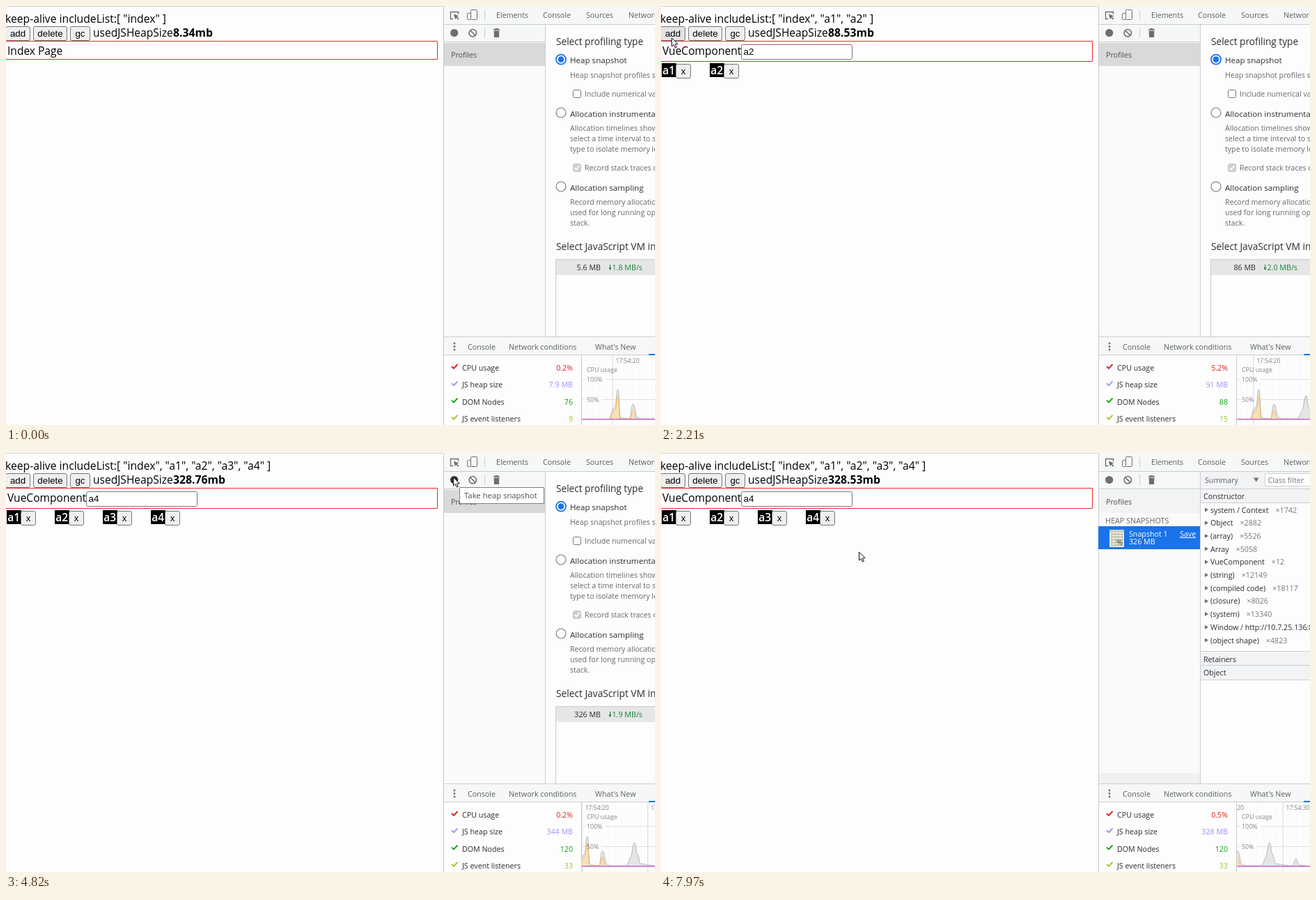
Recreate the animation shown at these times as an HTML page with a canvas. Size 932 by 601 pixels, loop 8 s.

```html
<!DOCTYPE html>
<html lang="en">
<head>
<meta charset="utf-8">
<title>Heap profiling of keep-alive</title>
<style>
html, body { margin: 0; width: 100%; height: 100%; overflow: hidden; background: #fdfdfd; }
canvas { display: block; width: 932px; height: 601px; }
</style>
</head>
<body>
<canvas id="stage" width="932" height="601"></canvas>
<script>
const ctx = document.getElementById('stage').getContext('2d');
const W = 932, H = 601, LOOP = 8000;
const SANS = '"Open Sans", "Noto Sans", sans-serif';
const ARIAL = '"Liberation Sans", Arial, sans-serif';
const UI = 10.7, PAGE = 15.55;
const BAR = '#f6f7f7', HEAD = '#f2f3f4', SIDE = '#fafafa';
const LINE = '#cacdd1', GREY = '#5a5e63', DARK = '#2a2c2f', SOFT = '#64676b', BLUE = '#1a73e8';

// Timeline: [start, values...]
const ADDS = [1290, 1870, 2280, 2700];
const HEAP = [[0, '8.34'], [1870, '88.53'], [2280, '168.72'], [2700, '248.88'], [3720, '328.76'], [6720, '328.53']];
const VM = [[0, '5.6', '1.8'], [1900, '86', '2.0'], [2560, '166', '2.3'], [3720, '326', '1.9']];
const MONITOR = [
  [0, '0.2%', '7.9', 76, 9], [920, '0.7%', '7.9', 78, 9], [1730, '5.2%', '91', 88, 15],
  [2350, '8.1%', '171', 98, 21], [2850, '7.4%', '251', 107, 27], [3400, '4.6%', '344', 120, 33],
  [4000, '0.2%', '344', 120, 33], [7300, '0.5%', '328', 120, 33]
];
const STATUS = [
  [5100, () => 'Snapshotting\u2026'],
  [5700, t => percent(t, 5700, 6010)],
  [6020, () => 'Parsing\u2026'],
  [6200, t => 'Loading nodes\u2026 ' + percent(t, 6200, 6560)],
  [6560, t => 'Loading edges\u2026 ' + percent(t, 6560, 6945)],
  [6950, () => 'Calculating\u2026']
];
const START = 5100, DONE = 7340;
const PATH = [
  [330, 150, 590], [760, 15, 46], [2740, 15, 46], [2980, 29, 60], [3320, 262, 132], [3880, 605, 126],
  [4020, 630, 102], [4160, 642, 35], [5130, 642, 35], [5500, 606, 140], [5840, 578, 212],
  [6200, 578, 212], [6700, 586, 218], [6960, 586, 218], [7460, 286, 150], [7560, 284, 142], [8000, 284, 142]
];

const at = (rows, t) => rows.filter(r => r[0] <= t).pop();
const percent = (t, a, b) => Math.min(100, Math.round(100 * (t - a) / (b - a))) + '%';

function text(s, x, y, size = UI, color = GREY, align = 'left', family = SANS, weight = '') {
  ctx.font = `${weight} ${size}px ${family}`;
  ctx.fillStyle = color;
  ctx.textAlign = align;
  ctx.fillText(s, x, y);
  return ctx.measureText(s).width;
}
function box(x, y, w, h, color) {
  ctx.fillStyle = color;
  ctx.fillRect(x, y, w, h);
}
const hline = (x, y, w, color = LINE) => box(x, y, w, 1, color);
const vline = (x, y, h, color = LINE) => box(x, y, 1, h, color);
function frame(x, y, w, h, r, fill, stroke) {
  ctx.beginPath();
  ctx.roundRect(x + .5, y + .5, w - 1, h - 1, r);
  paint(fill, stroke);
}
function circle(x, y, r, fill, stroke, width) {
  ctx.beginPath();
  ctx.arc(x, y, r, 0, Math.PI * 2);
  paint(fill, stroke, width);
}
function poly(points, fill, stroke, width, close = true) {
  ctx.beginPath();
  points.forEach(p => ctx.lineTo(p[0], p[1]));
  if (close) ctx.closePath();
  paint(fill, stroke, width);
}
function paint(fill, stroke, width = 1) {
  if (fill) { ctx.fillStyle = fill; ctx.fill(); }
  if (stroke) { ctx.strokeStyle = stroke; ctx.lineWidth = width; ctx.stroke(); }
}
function clipped(x, y, w, h, draw) {
  ctx.save();
  ctx.beginPath();
  ctx.rect(x, y, w, h);
  ctx.clip();
  draw();
  ctx.restore();
}
function button(label, x, y, w, h, hover) {
  frame(x, y, w, h, 2.5, hover ? '#e3e3e3' : '#efefef', '#767676');
  text(label, x + w / 2, y + h - 6, 13.33, '#000', 'center', ARIAL);
}

function drawPage(t) {
  hline(0, 0, 628, '#d4d4d4');
  const count = ADDS.filter(a => a <= t).length;
  const names = ['index'];
  for (let i = 1; i <= count; i++) names.push('a' + i);
  text(`keep-alive includeList:[ ${names.map(n => `"${n}"`).join(', ')} ]`, -1, 24, 15.7, '#000');

  button('add', -1, 29, 36, 21, t > 740 && t < 2800);
  button('delete', 39, 29, 49, 21);
  button('gc', 92, 29, 29, 21);
  text('usedJSHeapSize', 125, 43.5, PAGE, '#000');
  text(at(HEAP, t)[1] + 'mb', 240, 43.5, 15.75, '#000', 'left', SANS, 'bold');

  frame(-1, 50, 621, count ? 30 : 27, 0, null, '#f02828');
  if (!count) {
    text('Index Page', 2, 70, PAGE, '#000');
    return;
  }
  text('VueComponent', 2, 70, PAGE, '#000');
  frame(115, 55, 160, 22, 2, '#fff', '#767676');
  text('a' + count, 118.5, 70, 13.33, '#000', 'left', ARIAL);
  for (let i = 0; i < count; i++) {
    const x = Math.round(.6 + i * 69.2);
    box(x, 82, 21, 20, '#000');
    text('a' + (i + 1), x + 1.2, 97.5, PAGE, '#fff', 'left', SANS, '600');
    button('x', x + 20, 83, 22, 21);
  }
}

function drawToolbars(t) {
  box(628, 0, W - 628, 26, BAR);
  box(628, 27, 146, 24, BAR);
  box(628, 475, W - 628, 25, BAR);
  hline(628, 26, W - 628);
  hline(628, 51, 146);
  hline(628, 474, W - 628);
  hline(628, 500, W - 628);
  vline(628, 0, H);
  vline(774, 27, 447);

  // inspect and device icons
  poly([[642, 18.5], [638.5, 18.5], [638.5, 8.5], [649.5, 8.5], [649.5, 12]], null, '#6e6e6e', 1.3, false);
  poly([[643, 11.5], [650.5, 14.5], [647.6, 15.6], [650.5, 18.6], [649.3, 19.8], [646.3, 16.8], [645, 19.5]], '#6e6e6e');
  frame(667, 5, 10, 15, 1, null, '#6e6e6e');
  frame(662, 10, 6, 10, 1, BAR, '#6e6e6e');
  vline(687, 6, 14);
  ['Elements', 'Console', 'Sources', 'Network'].forEach((s, i) => text(s, [704, 771, 833, 894][i], 17));

  // record, clear and delete icons
  circle(643.7, 38.5, 5.6, t > 4150 && t < 5200 ? '#303030' : '#6e6e6e');
  circle(670.3, 38.7, 5.2, null, '#6e6e6e', 1.6);
  poly([[666.7, 35], [674, 42.4]], null, '#6e6e6e', 1.6, false);
  vline(687, 31, 15);
  box(700, 33, 9, 1.6, '#6e6e6e');
  box(702.5, 32, 4, 1.5, '#6e6e6e');
  poly([[700.7, 35.6], [708.3, 35.6], [708, 45], [701, 45]], '#6e6e6e');

  [484, 488.5, 493].forEach(y => circle(644, y, 1.4, '#6e6e6e'));
  text('Console', 663, 492.5);
  text('Network conditions', 722, 492.5);
  text("What's New", 846, 492.5);
  box(923, 499, 9, 2, BLUE);
}

function drawSidebar(t) {
  const done = t >= DONE;
  box(629, 52, 145, 422, SIDE);
  box(629, 53, 145, 33, done ? HEAD : '#d9d9d9');
  text('Profiles', 639, 73.5, UI, '#4a4d51');
  if (t < START) return;
  text('HEAP SNAPSHOTS', 638, 100.5, 10.8, SOFT);
  clipped(628, 105, 146, 369, () => {
    if (done) {
      box(628, 105, 146, 33, BLUE);
      drawSheet();
      text('Snapshot 1', 672, 120, UI, '#fff');
      text('326 MB', 672, 131, UI, '#fff');
      hline(745, 121, text('Save', 745, 120, UI, '#fff'), '#fff');
      box(629, 459, 145, 15, '#f1f1f1');
      return;
    }
    box(642, 110, 25, 26, '#f0f1f1');
    const mid = -Math.PI / 4 + (t - 5950) / 1040 * Math.PI * 2;
    ctx.beginPath();
    ctx.arc(654, 123, 11, mid - .85, mid + .85);
    paint(null, '#6e6e6e', 2.6);
    text('Snapshot 1', 672, 120, UI, '#222');
    text(at(STATUS, t)[1](t), 672, 131, UI, '#222');
    if (t > 6200) {
      box(629, 459, 145, 15, '#f1f1f1');
      box(644, 460, 107, 13, '#c1c1c1');
      poly([[638, 463.5], [638, 469.5], [634.5, 466.5]], '#a3a3a3');
      poly([[764.5, 463.5], [764.5, 469.5], [768, 466.5]], '#505050');
    }
  });
}

function drawSheet() {
  box(644, 110, 21, 25, '#eceadb');
  box(644, 110, 21, 4, '#cfd0bd');
  for (let i = 0; i < 5; i++) hline(646, 116 + i * 4, 17, '#a9aa98');
  for (let i = 0; i < 4; i++) vline(647 + i * 5, 115, 18, '#bbbca9');
  text('%', 654, 132, 10, '#77796b', 'left', SANS, 'bold');
}

function radio(y, label, on) {
  circle(797, y, 7, '#fff', on ? BLUE : '#767676', on ? 1.8 : 1.1);
  if (on) circle(797, y, 4.3, BLUE);
  text(label, 810, y + 5.7, 11.6, DARK);
}

function drawSetup(t) {
  text('Select profiling type', 790, 56, 13.65, DARK);
  radio(76.6, 'Heap snapshot', true);
  radio(153, 'Allocation instrumentation on timeline');
  radio(259, 'Allocation sampling');
  [
    [102.5, 'Heap snapshot profiles show memory'],
    [179, 'Allocation timelines show instrumented'],
    [194, 'select a time interval to see objects'],
    [209, 'type to isolate memory leaks.'],
    [284.5, 'Record memory allocations using'],
    [300, 'used for long running operations'],
    [315, 'stack.']
  ].forEach(([y, s]) => text(s, 810, y, 10.65, SOFT));
  frame(814, 120, 12, 12, 2, '#fff', '#767676');
  text('Include numerical values', 831, 129.5, 10.65, SOFT);
  frame(814, 226, 12, 12, 2, '#cfcfcf', '#c6c6c6');
  poly([[816.5, 232], [819, 234.5], [823.5, 229]], null, '#fff', 1.6, false);
  text('Record stack traces of', 831, 236, 10.65, SOFT);

  text('Select JavaScript VM instance', 790, 350, 13.75, DARK);
  box(790, 363, 142, 23, '#e6e6e6');
  hline(789, 363, 143);
  vline(789, 363, 111);
  const [, size, rate] = at(VM, t);
  text(size + ' MB', 854, 379, UI, DARK, 'right');
  box(867, 371, 1.1, 6, '#188038');
  poly([[865.4, 375.4], [869.7, 375.4], [867.5, 379]], '#188038');
  text(rate + ' MB/s', 870.5, 379, UI, '#188038');
}

function drawSummary() {
  box(775, 27, 157, 24, HEAD);
  hline(775, 51, 157);
  text('Summary', 781, 43);
  poly([[851, 35.5], [858.5, 35.5], [854.7, 41.5]], '#6e6e6e');
  frame(867, 29, 80, 19, 0, '#fff', '#cfcfcf');
  text('Class filter', 871.5, 43, UI, '#757575');
  box(775, 52, 157, 19, HEAD);
  hline(775, 71, 157);
  text('Constructor', 779, 66, UI, DARK);
  [
    ['system / Context', 1742], ['Object', 2882], ['(array)', 5526], ['Array', 5058],
    ['VueComponent', 12], ['(string)', 12149], ['(compiled code)', 18117], ['(closure)', 8026],
    ['(system)', 13340], ['Window / http://10.7.25.136:8', 1], ['(object shape)', 4823]
  ].forEach(([name, n], i) => {
    const y = 85.5 + i * 18.7;
    poly([[781, y - 7], [781, y - 1], [786, y - 4]], '#6e6e6e');
    const w = text(name, 789, y, UI, DARK);
    text('\u00d7' + n, 799 + w, y, UI, '#777');
  });
  box(775, 284, 157, 41, HEAD);
  [284, 304, 325].forEach(y => hline(775, y, 157));
  text('Retainers', 779, 300, UI, DARK);
  text('Object', 779, 319, UI, DARK);
}

// Area curve with flat tangents at every point; heights are above the base line.
function area(points, base, fill, stroke) {
  ctx.beginPath();
  ctx.moveTo(points[0][0], base);
  points.forEach(([x, h], i) => {
    if (!i) return;
    const [px, ph] = points[i - 1], mid = (px + x) / 2;
    ctx.bezierCurveTo(mid, base - ph, mid, base - h, x, base - h);
  });
  paint(fill, stroke, .9);
}

const TOTAL = [
  [866, 0], [872, 14], [874.5, 17], [878.5, 42], [883, 1], [895, 0], [900.5, 21], [907, 2], [912, 0],
  [933, 0], [937, 3], [940, 11], [946.5, 33], [951, 16], [955, 3], [962, 2], [966, 1], [979, 0], [984.5, 10], [989, 1], [1000, 0]
];
const SCRIPT = [
  [867, 0], [872, 9], [875, 13], [878.5, 32], [882, 0], [896, 0], [900.5, 12], [905, 0]
];

function drawChart(t) {
  const shift = -t * .0091, base = 592;
  vline(826, 501, 100);
  clipped(827, 501, 105, 100, () => {
    for (let i = -5; i < 15; i++) {
      vline(870.5 + i * 9.46 + shift, 501, 100, i % 10 ? 'rgba(0,0,0,.025)' : 'rgba(0,0,0,.15)');
    }
    [[535, 861], [564, 856]].forEach(([y, x]) => {
      hline(827, y, 5, '#e0e0e0');
      hline(x, y, W - x, '#e0e0e0');
    });
    ctx.save();
    ctx.translate(shift, 0);
    area(TOTAL, base, 'rgba(200,200,200,.45)', '#b4b4b4');
    area(SCRIPT, base, 'rgba(255,224,170,.75)', '#f2bb62');
    text('17:54:20', 875.5, 511.5, 8.6, '#808080');
    text('17:54:30', 970, 511.5, 8.6, '#808080');
    ctx.restore();
    box(827, 592, 105, 1.5, '#c865c8');
    text('CPU usage', 834, 525, 8.85, '#858585');
    text('100%', 834, 538.5, 8.9, '#858585');
    text('50%', 834, 567.5, 8.9, '#858585');
  });
}

function drawMonitor(t) {
  const [, cpu, heap, nodes, listeners] = at(MONITOR, t);
  [
    ['CPU usage', cpu, '#e0201b'], ['JS heap size', heap + ' MB', '#9696fa'],
    ['DOM Nodes', nodes, '#0fa00f'], ['JS event listeners', listeners, '#96c828']
  ].forEach(([label, value, color], i) => {
    const y = 523 + i * 24.3;
    poly([[640, y - 6], [643, y - 3.2], [648.5, y - 9]], null, color, 1.9, false);
    text(label, 655, y, UI, DARK);
    text(value, 814, y, UI, color, 'right');
  });
  drawChart(t);
}

function drawPointer(t) {
  if (t < PATH[0][0]) return;
  const i = Math.max(1, PATH.findIndex(p => p[0] > t));
  const [t0, x0, y0] = PATH[i - 1], [t1, x1, y1] = PATH[i];
  const k = (t - t0) / (t1 - t0);
  const x = x0 + (x1 - x0) * k, y = y0 + (y1 - y0) * k;
  if (t > 2880 && t < 3060) {
    box(x - .5, y - 5, 1.2, 11, '#222');
    box(x - 2.5, y - 5.5, 5, 1, '#222');
    box(x - 2.5, y + 5.5, 5, 1, '#222');
    return;
  }
  const tip = [[0, 0], [0, 12], [2.8, 9.5], [4.8, 14], [6.8, 13.1], [4.9, 8.9], [8.6, 8.6]];
  poly(tip.map(([a, b]) => [x + a + .5, y + b]), '#fff', '#111', 1);
}

function drawTooltip(t) {
  if (t < 4620 || t > START) return;
  frame(651, 49, 122, 24, 0, '#fff', '#808080');
  text('Take heap snapshot', 658, 65, 11.3, '#505050');
}

function draw(t) {
  box(0, 0, W, H, '#fdfdfd');
  drawPage(t);
  drawToolbars(t);
  drawSidebar(t);
  if (t < DONE) drawSetup(t);
  else drawSummary();
  drawMonitor(t);
  drawTooltip(t);
  drawPointer(t);
}

const begin = performance.now();
function tick() {
  draw((performance.now() - begin) % LOOP);
  requestAnimationFrame(tick);
}
tick();
</script>
</body>
</html>
```
